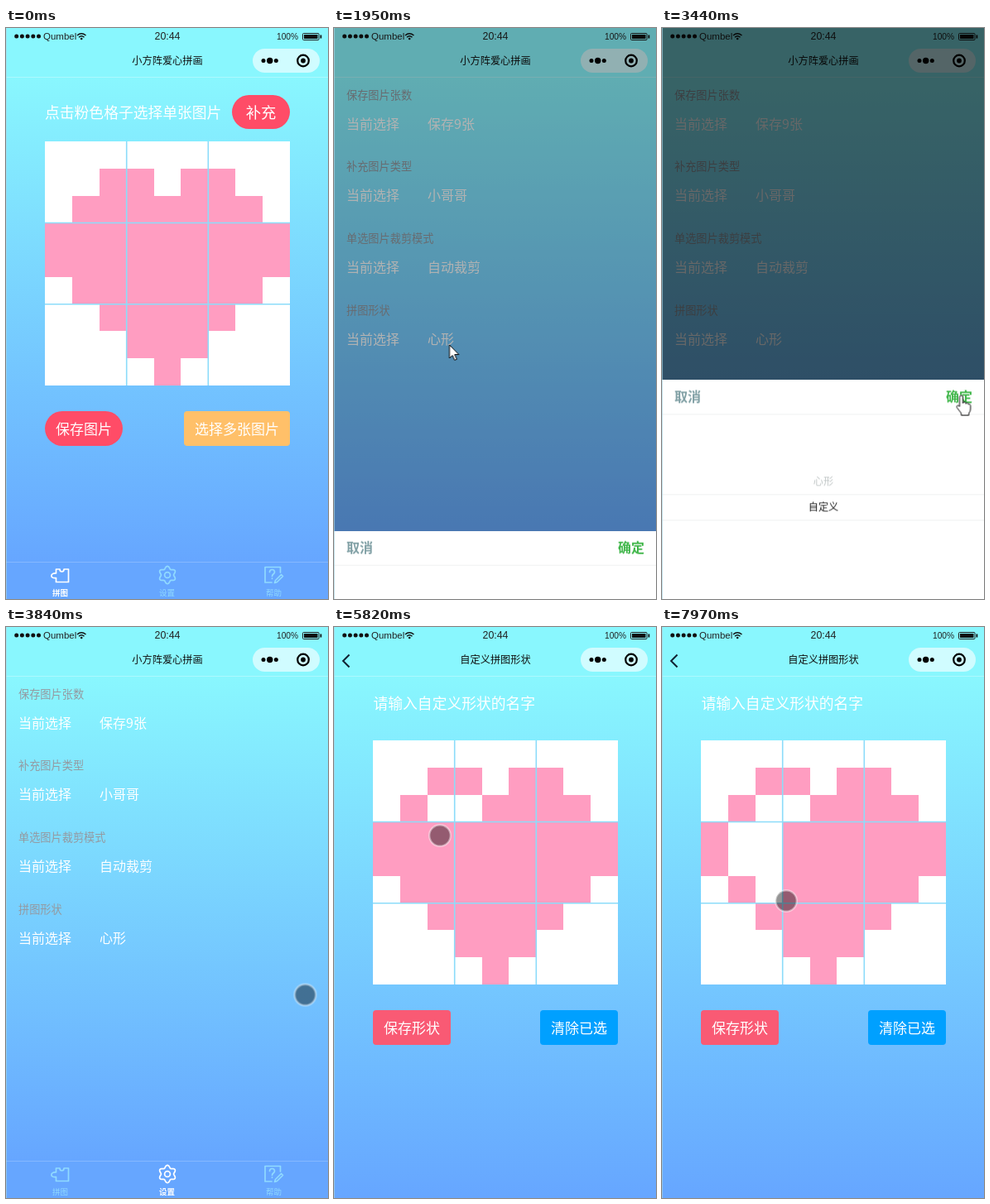
An HTML page for the animation above (8000 ms loop, 389 px wide and 690 px high).

```html
<!DOCTYPE html>
<html lang="zh">
<head>
<meta charset="utf-8">
<title>拼画</title>
<style>
html, body { margin: 0; width: 100%; height: 100%; overflow: hidden; background: #66a6ff; }
svg { display: block; width: 389px; height: 690px; }
text { font-family: "Noto Sans CJK SC", "Noto Sans CJK", "Noto Sans", sans-serif; }
.latin { font-family: "Liberation Sans", Arial, sans-serif; }
.mono { font-family: "DejaVu Sans Mono", monospace; }
.mid { text-anchor: middle; }
.white { fill: #fff; }
.title { font-size: 12.2px; text-anchor: middle; fill: #111; }
.big { font-size: 17.8px; fill: #fff; }
.btn { font-size: 17px; fill: #fff; text-anchor: middle; }
.tab { fill: none; stroke: #90daff; stroke-width: 1.7; stroke-linejoin: round; stroke-linecap: round; }
.tab text { fill: #90daff; stroke: none; font-size: 9.5px; text-anchor: middle; }
.tab.on { stroke: #fff; }
.tab.on text { fill: #fff; font-weight: 700; }
.cell, .board { shape-rendering: crispEdges; }
.cell { fill: #ff9dc1; }

/* 1% of the loop is 80 ms */
.step { animation: 8s step-end infinite; }
.flow { animation: 8s linear infinite; }

#home { animation-name: home; }
#settings { animation-name: settings; }
#custom { animation-name: custom; }
#size { animation-name: size; }
@keyframes home { 11.5%, 100% { opacity: 0; } }
@keyframes settings { 0% { opacity: 0; } 11.5% { opacity: 1; } 49%, 100% { opacity: 0; } }
@keyframes custom { 0% { opacity: 0; } 49%, 100% { opacity: 1; } }
@keyframes size { 0% { opacity: 0; } 49.5% { opacity: 1; } 61.5%, 100% { opacity: 0; } }

#shade { animation-name: shade; }
#panel { animation-name: panel; }
#wheel { animation-name: wheel; }
#heart { animation-name: unpick; }
#own { animation-name: pick; }
@keyframes shade { 0%, 22.75% { opacity: 0; } 26%, 43% { opacity: 1; } 46.75%, 100% { opacity: 0; } }
@keyframes panel {
  0%, 23.6% { transform: translateY(268px); animation-timing-function: ease; }
  27.35%, 43% { transform: none; animation-timing-function: ease; }
  46.75%, 100% { transform: translateY(268px); }
}
@keyframes wheel {
  0%, 31% { transform: none; animation-timing-function: ease-out; }
  34.75%, 100% { transform: translateY(-31px); }
}
@keyframes unpick { 0%, 31% { fill: #1c2422; } 34.75%, 100% { fill: #c0c6c6; } }
@keyframes pick { 0%, 31% { fill: #a9b6ba; } 34.75%, 100% { fill: #222; } }

@keyframes off1 { 64.75% { opacity: 0; } }
@keyframes off2 { 69.75% { opacity: 0; } }
@keyframes off3 { 75.75% { opacity: 0; } }
@keyframes off4 { 81.625% { opacity: 0; } }
@keyframes off5 { 87.5% { opacity: 0; } }
@keyframes off6 { 92.5% { opacity: 0; } }
@keyframes off7 { 96.625% { opacity: 0; } }

#cursor { animation-name: travel; }
#touch { animation-name: touch; }
#arrow { animation-name: arrow; }
#hand { animation-name: hand; }
#press { animation-name: press; }
@keyframes travel {
  0%, 3.625% { transform: translate(246px, 706px); }
  9.625%, 16% { transform: translate(188px, 656px); }
  19.375% { transform: translate(161px, 422px); }
  22.5%, 26.375% { transform: translate(139.5px, 383px); }
  29%, 33% { transform: translate(195px, 618px); }
  37% { transform: translate(352px, 451px); }
  39%, 50.25% { transform: translate(361.5px, 444.5px); }
  52.75% { transform: translate(308px, 396px); }
  54.75%, 55.25% { transform: translate(226px, 322px); }
  60%, 66% { transform: translate(160px, 220px); }
  69%, 70.5% { transform: translate(128px, 222px); }
  72.5%, 75.75% { transform: translate(128px, 252px); }
  79.625%, 84% { transform: translate(108px, 265px); }
  86.5%, 89% { transform: translate(100px, 284px); }
  91.5%, 92.75% { transform: translate(128px, 287px); }
  94.625%, 95.5% { transform: translate(131px, 305px); }
  99%, 100% { transform: translate(150px, 331px); }
}
@keyframes touch { 23.25% { opacity: 0; } 46.75%, 100% { opacity: 1; } }
@keyframes arrow { 0% { opacity: 0; } 23.25% { opacity: 1; } 36%, 100% { opacity: 0; } }
@keyframes hand { 0% { opacity: 0; } 36% { opacity: 1; } 46.75%, 100% { opacity: 0; } }
@keyframes press { 0% { opacity: 0; } 41% { opacity: 1; } 43%, 100% { opacity: 0; } }
</style>
</head>
<body>
<svg viewBox="0 0 389 690">
  <defs>
    <linearGradient id="sky" x2="0" y2="1">
      <stop stop-color="#89f7fe"/><stop offset="1" stop-color="#66a6ff"/>
    </linearGradient>
  </defs>
  <rect width="389" height="60" fill="#89f7fe"/>

  <g id="home" class="step">
    <rect y="59" width="389" height="586" fill="url(#sky)"/>
    <text class="title" x="195" y="43.5">小方阵爱心拼画</text>
    <text class="big" x="47" y="109">点击粉色格子选择单张图片</text>
    <rect x="273" y="81" width="70" height="41" rx="20.5" fill="#ff4c67"/>
    <text class="btn" x="308" y="109" style="font-size:18.3px">补充</text>
    <g class="grid"></g>
    <rect x="47" y="463" width="94" height="42" rx="21" fill="#ff4c67"/>
    <text class="btn" x="94" y="491">保存图片</text>
    <rect x="215" y="463" width="128" height="42" rx="4" fill="#ffc069"/>
    <text class="btn" x="279" y="491">选择多张图片</text>
    <g class="tabs" data-on="0"></g>
  </g>

  <g id="settings" class="step">
    <rect y="59" width="389" height="586" fill="url(#sky)"/>
    <text class="title" x="195" y="43.5">小方阵爱心拼画</text>
    <g id="rows"></g>
    <g class="tabs" data-on="1"></g>
  </g>

  <g id="custom" class="step">
    <rect y="59" width="389" height="631" fill="url(#sky)"/>
    <text class="title" x="195" y="43.5">自定义拼图形状</text>
    <path d="M18.5 33.5 11 41l7.5 7.5" fill="none" stroke="#123" stroke-width="2"/>
    <text class="big" x="47.5" y="99">请输入自定义形状的名字</text>
    <g class="grid" data-edit="1"></g>
    <rect x="47" y="463" width="94" height="42" rx="4" fill="#f95a74"/>
    <text class="btn" x="94" y="491">保存形状</text>
    <rect x="249" y="463" width="94" height="42" rx="4" fill="#00a0ff"/>
    <text class="btn" x="296" y="491">清除已选</text>
    <g id="size" class="step">
      <rect x="284" y="60" width="105" height="24" fill="#f0fbff" opacity=".88"/>
      <text class="mono" x="289.5" y="77" font-size="11.9" fill="#667">414px × 672px</text>
    </g>
  </g>

  <g id="bar">
    <g id="signal" fill="#111"></g>
    <text class="latin" x="45" y="14" font-size="11.5" fill="#222">Qumbel</text>
    <g fill="none" stroke="#111" stroke-width="1.5">
      <path d="M86 9q5-4.5 10.5 0M88 11.2q3.2-2.8 6.5 0"/>
      <circle cx="91.2" cy="13" r=".6"/>
    </g>
    <text class="latin mid" x="195" y="14.3" font-size="12.4" fill="#222">20:44</text>
    <text class="latin" x="327" y="13.7" font-size="10.2" fill="#222">100%</text>
    <rect x="358.5" y="6.5" width="19.5" height="8" rx="1" fill="none" stroke="#222"/>
    <path d="M360 8h16.5v5H360zM379.5 8.5h1.8v4h-1.8z" fill="#111"/>
    <path d="M0 59.5H389" stroke="#fff" opacity=".3"/>
    <rect x="298" y="25" width="81" height="29" rx="14.5" fill="#fff" fill-opacity=".6"/>
    <circle cx="311" cy="39.5" r="2.5"/><circle cx="318.7" cy="39.5" r="3.7"/><circle cx="326.3" cy="39.5" r="2.5"/>
    <circle cx="359" cy="39.5" r="6.8" fill="none" stroke="#000" stroke-width="2.2"/>
    <circle cx="359" cy="39.5" r="2.9"/>
  </g>

  <rect id="shade" class="flow" width="389" height="690" fill="rgba(0,0,0,.6)"/>
  <g id="panel" class="flow">
    <rect y="425" width="389" height="267" fill="#fff"/>
    <path d="M0 466.5H389M0 563.5H389M0 594.5H389" stroke="#f0f2f2"/>
    <g font-size="16" font-weight="700">
      <text x="15" y="451" fill="#7f9fa4">取消</text>
      <text x="343" y="451" fill="#3fb649">确定</text>
    </g>
    <g id="wheel" class="flow mid" font-size="12.2">
      <text id="heart" class="flow" x="195" y="582.7">心形</text>
      <text id="own" class="flow" x="195" y="613.7">自定义</text>
    </g>
  </g>
  <rect width="1" height="690" fill="#a9d8e6" opacity=".6"/>

  <g id="cursor" class="flow">
    <circle id="touch" class="step" r="12.8" fill="#000" fill-opacity=".42" stroke="#fff" stroke-opacity=".42" stroke-width="2.4"/>
    <circle id="press" class="step" r="14" fill="#000" fill-opacity=".12"/>
    <path id="arrow" class="step" d="M0 0V16l3.7-3.4 2.5 5.8 2.6-1.1-2.5-5.7h5z" fill="#fff" stroke="#000"/>
    <path id="hand" class="step" d="M-2 1.5a2 2 0 0 1 4 0V9a1.8 1.8 0 0 1 3.6.6a1.7 1.7 0 0 1 3.2.8a1.5 1.5 0 0 1 2.4 1.2V16q0 3-2 5v2.5H0V21l-5-6.5c-1.5-2.6 1-4 3-1.5z" fill="#fff" stroke="#000"/>
  </g>
</svg>
<script>
const $$ = q => document.querySelectorAll(q);

// Heart as [first, last] filled column of each row
const spans = [null, [2, 6], [1, 7], [0, 8], [0, 8], [1, 7], [2, 6], [3, 5], [4, 4]];
const cleared = ['2,3', '2,2', '3,2', '3,1', '4,1', '4,2', '5,2'];
const left = 47, top0 = 137, cw = 296 / 9, ch = 295 / 9;
const edgeX = c => Math.round(left + c * cw);
const edgeY = r => Math.round(top0 + r * ch);

function grid(editable) {
  let out = `<rect class="board" x="${left}" y="${top0}" width="296" height="295" fill="#fff"/>`;
  spans.forEach((span, r) => {
    if (!span) return;
    for (let c = span[0]; c <= span[1]; c++) {
      if (r === 1 && c === 4) continue;
      const x = edgeX(c), y = edgeY(r);
      const n = editable ? cleared.indexOf(r + ',' + c) + 1 : 0;
      const anim = n ? ` style="animation:off${n} 8s step-end infinite"` : '';
      out += `<rect class="cell"${anim} x="${x}" y="${y}" width="${edgeX(c + 1) - x}" height="${edgeY(r + 1) - y}"/>`;
    }
  });
  return out + '<path d="M145.7 137V432M244.3 137V432M47 235.5H343M47 333.7H343" stroke="#8cdcfa" stroke-width="1.6"/>';
}

function gear(cx, cy) {
  const pts = Array.from({ length: 60 }, (_, i) => {
    const a = i * Math.PI / 30, r = 9.1 - 1.5 * Math.cos(6 * a);
    return (cx + r * Math.cos(a)).toFixed(1) + ',' + (cy + r * Math.sin(a)).toFixed(1);
  });
  return `<polygon points="${pts.join(' ')}"/><circle cx="${cx}" cy="${cy}" r="3.4"/>`;
}

const tabs = [
  [65.5, '拼图', '<path d="M60.5 654H65c0 4 5 4 5 0h5.5v15.5h-15v-5c-7.5 1.5-7.5-6.5 0-5.5z"/>'],
  [194.5, '设置', gear(195, 661)],
  [323.5, '帮助', '<path d="M331.5 658v-6.500H313V670h8M318.5 657.5c0-4 6-4 6 0 0 2.5-3 2-3 5M321.5 665v.3M324.5 670.5l1-3 7-7 2 2-7 7z"/>']
];

function tabBar(on) {
  return '<rect y="645" width="389" height="45" fill="#66a6ff"/><path d="M0 645.5H389" stroke="#fff" opacity=".2"/>' +
    tabs.map(([x, name, icon], i) =>
      `<g class="tab${i === on ? ' on' : ''}">${icon}<text x="${x}" y="685.5">${name}</text></g>`).join('');
}

const options = [['保存图片张数', '保存9张'], ['补充图片类型', '小哥哥'], ['单选图片裁剪模式', '自动裁剪'], ['拼图形状', '心形']];

$$('.grid').forEach(g => g.innerHTML = grid(g.dataset.edit));
$$('.tabs').forEach(g => g.innerHTML = tabBar(+g.dataset.on));
$$('#rows')[0].innerHTML = options.map(([label, value], i) => {
  const y = 85.5 + i * 86.9;
  return `<text x="15" y="${y}" font-size="13.2" fill="#9499a0">${label}</text>
    <g class="white" font-size="16"><text x="15" y="${y + 36}">当前选择</text><text x="113" y="${y + 36}">${value}</text></g>`;
}).join('');
$$('#signal')[0].innerHTML = [0, 1, 2, 3, 4].map(i => `<circle cx="${12.7 + i * 6.7}" cy="10" r="2.5"/>`).join('');
</script>
</body>
</html>
```
